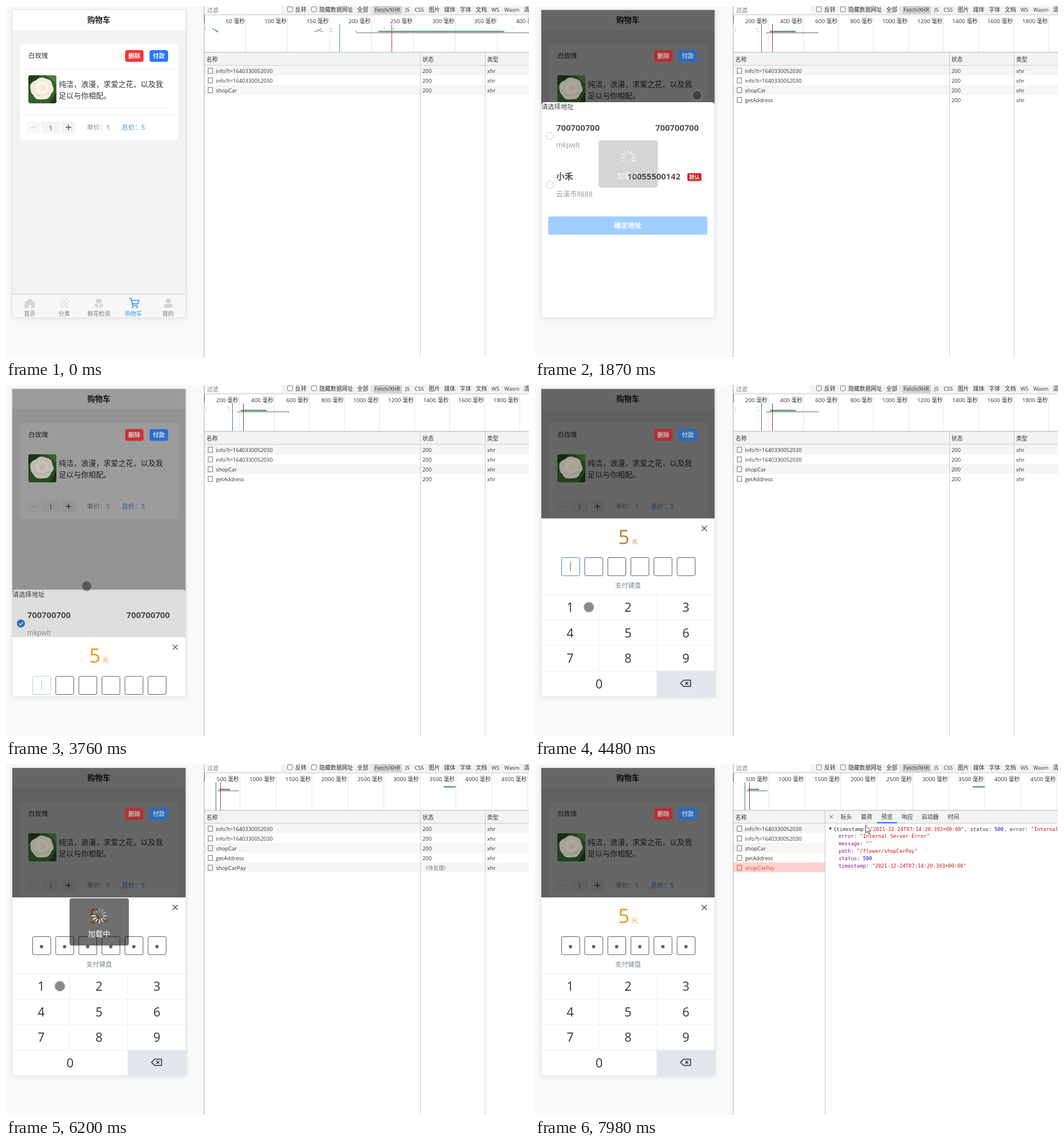
Recreate the animation shown at these times as an HTML page. Size 913x613 px, loop 8 s.

```html
<!DOCTYPE html>
<html lang="zh-CN">
<head>
<meta charset="utf-8">
<title>购物车</title>
<style>
html, body { margin: 0; width: 100%; height: 100%; overflow: hidden; background: #f8faf9; }
svg { display: block; font-family: "Open Sans", "Noto Sans CJK SC", "Noto Sans CJK", sans-serif; }
.mono { font-family: "DejaVu Sans Mono", monospace; white-space: pre; }
</style>
</head>
<body>
<svg id="stage" width="913" height="613" viewBox="0 0 913 613"></svg>
<script>
const LOOP = 8000;

// --- markup helpers: text is placed by its vertical centre ---
const rect = (x, y, w, h, fill, more = '') =>
  `<rect x="${x}" y="${y}" width="${w}" height="${h}" fill="${fill}" ${more}/>`;
const line = (x1, y1, x2, y2, color, w = 1) =>
  `<path d="M${x1} ${y1}L${x2} ${y2}" stroke="${color}" stroke-width="${w}"/>`;
const circle = (x, y, r, fill, more = '') =>
  `<circle cx="${x}" cy="${y}" r="${r}" fill="${fill}" ${more}/>`;
const path = (d, fill, more = '') => `<path d="${d}" fill="${fill}" ${more}/>`;
const text = (x, y, s, size, fill = '#333', more = '') =>
  `<text x="${x}" y="${y + size * 0.365}" font-size="${size}" fill="${fill}" ${more}>${s}</text>`;
const group = (id, body, more = '') => `<g id="${id}" ${more}>${body}</g>`;
const range = (n, f) => Array.from({ length: n }, (_, i) => f(i)).join('');
const MID = 'text-anchor="middle"', END = 'text-anchor="end"', BOLD = 'font-weight="700"';
const MIDBOLD = MID + ' ' + BOLD;

// --- shop page ---
function stepper() {
  return rect(36, 202, 24, 20, '#f7f8fa', 'rx="2"') + rect(62, 202, 32, 20, '#f2f3f5') +
    rect(97, 202, 24, 20, '#f2f3f5', 'rx="2"') + line(43, 212, 53, 212, '#c8c9cc') +
    line(104, 212, 114, 212, '#333', 1.2) + line(109, 207, 109, 217, '#333', 1.2) +
    text(78, 212.5, '1', 11.3, '#5a3a40', MID);
}

function tabBar() {
  const gray = '#d3d4d3', blue = '#2f95f3';
  const petals = range(4, i => circle(98.5 + i % 2 * 7.6, 515.3 + (i >> 1) * 7.6, 3,
    'none', 'stroke="#dcdddd" stroke-width="1.1"'));
  const icons =
    path('M41.5 511L50 518V527H44V521.5H39V527H33V518Z', gray, `stroke="${gray}" stroke-linejoin="round"`) +
    petals +
    path('M157 511L159.7 513L162 510L164.3 513L167 511V516Q166 520 162 520Q158 520 157 516Z' +
      'M154 520Q160 519 161 524V527Q155 527 154 520M170 520Q164 519 163 524V527Q169 527 170 520', gray) +
    path('M215 511H218.5L221 523H230M219.3 514H232L230 520H220.5', 'none',
      `stroke="${blue}" stroke-width="1.7" stroke-linejoin="round"`) +
    circle(221.5, 526, 1.5, blue) + circle(229, 526, 1.5, blue) +
    circle(283.5, 515, 4.3, gray) + path('M276 527V524Q276 520 280 520H287Q291 520 291 524V527Z', gray);
  const names = ['首页', '分类', '鲜花检测', '购物车', '我的'];
  return rect(11, 504, 303, 40, '#f7f7fa') + line(11, 503.5, 314, 503.5, '#cfcfd2') + icons +
    names.map((s, i) => text(41.3 + i * 60.4, 537, s, 9.9, i === 3 ? blue : '#777', MID)).join('');
}

function shopPage() {
  return rect(11, 6, 303, 538, '#f2f2f2') + rect(11, 6, 303, 36, '#fff') +
    text(162, 24.5, '购物车', 13.3, '#222', MIDBOLD) +
    rect(24, 66, 277, 168, '#fff', 'rx="5"') +
    text(39, 87, '白玫瑰', 11.4) +
    line(24, 109.5, 301, 109.5, '#f1f1f1') + line(36, 178, 288, 178, '#f4f4f4') +
    line(24, 190.5, 301, 190.5, '#f0f0f0') +
    text(92, 136.5, '纯洁，浪漫，求爱之花，以及我', 13) + text(92, 156, '足以与你相配。', 13) +
    stepper() + text(141, 212, '单价：5', 11.3, '#8c8c8c') + text(202, 212, '总价：5', 11.3, '#3a86ee') +
    tabBar();
}

// Parts that stay brighter than the rest under the dark layer.
function brightParts() {
  const rose = rect(39, 121, 49, 49, '#33602a') +
    path('M39 121H60L46 140L39 136ZM88 150L76 170H88Z', '#20401b') + path('M70 121H88V136Z', '#4f7c3c') +
    path('M43 146Q40 133 52 130Q60 122 70 127Q80 128 81 139Q86 147 79 153Q76 164 64 163Q51 165 48 156Q43 152 43 146', '#f3ece0') +
    circle(63, 143, 11, '#fcf6ea') + circle(64, 143, 6, '#f7e8cc') +
    path('M50 153Q62 160 76 151', 'none', 'stroke="#e2d8c6" stroke-width="1.5"');
  const button = (x, w, color, s) => rect(x, 77, w, 20.5, color, 'rx="4"') +
    text(x + w / 2, 87.3, s, 10.4, '#fff', MIDBOLD);
  return `<g clip-path="url(#thumb)">${rose}</g>` +
    button(208, 32, '#f53338', '删除') + button(250.5, 32.5, '#2878ff', '付款') +
    group('brightDim', rect(39, 121, 49, 49, '#000', 'rx="4"') +
      rect(208, 77, 32, 20.5, '#2a2c2c', 'rx="4"') + rect(250.5, 77, 32.5, 20.5, '#2b5038', 'rx="4"'));
}

function addressSheet() {
  const entry = (y, name, x, phone, place) =>
    text(37, y, name, 14.8, '#555', BOLD) + text(x, y, phone, 14.8, '#555', BOLD) +
    text(37, y + 30.5, place, 12, '#999') +
    circle(26, y + 14.5, 6.5, '#fff', 'stroke="#c8c9cc"');
  const shape = 'M11 544V174Q11 168 17 168H308Q314 168 314 174V544Z';
  return path(shape, '#fff') +
    text(11, 176, '请选择地址', 11.3, '#444') +
    entry(212.5, '700700700', 210, '700700700', 'mkpwlt') +
    entry(298, '小禾', 161, '10055500142', '云溪市8888') +
    rect(266, 292, 24.5, 13.5, '#dd1418', 'rx="2"') + text(278.2, 298.8, '默认', 9.3, '#fff', MIDBOLD) +
    group('check', circle(26, 227, 7, '#3381c8') +
      path('M22.7 227L25.2 229.6L29.6 224.6', 'none', 'stroke="#fff" stroke-width="1.5"')) +
    rect(23, 367.5, 278, 32, '#a0cfff', 'rx="4" id="confirm"') +
    text(162, 383.5, '确定地址', 12, '#fff', MIDBOLD) +
    group('sheetDim', path(shape, '#000'));
}

const boxX = i => 46 + i * 40.3;
function paySheet() {
  const rows = [366.5, 410.5, 455, 499.5];
  const digits = range(9, i => text(61.5 + i % 3 * 101, 388.5 + (i / 3 | 0) * 44.4, i + 1, 21.5, '#333', MID));
  return rect(11, 233, 303, 311, '#fff') +
    path('M291 246L300 255M300 246L291 255', 'none', 'stroke="#444" stroke-width="1.2"') +
    group('amount', text(155, 265.3, '5', 34.5, 'currentColor', MID) + text(169, 273, '元', 10, 'currentColor')) +
    range(6, i => rect(boxX(i) + .5, 301.5, 31.5, 31.5, '#fff', 'class="box" rx="2"') +
      circle(boxX(i) + 16, 319, 3, '#666', 'class="dot"')) +
    rect(0, 309, 1, 16, '#555', 'id="caret"') +
    text(162.5, 350, '支付键盘', 11.3, '#7d8894', MID) +
    rect(11, 366, 101, 45, '#eeeff2', 'id="keyDown"') +
    rows.map(y => line(11, y, 314, y, '#f0f0f2')).join('') +
    line(111.5, 366, 111.5, 499, '#f0f0f2') + line(212.5, 366, 212.5, 544, '#f0f0f2') +
    rect(213, 499.5, 101, 44.5, '#e4e6ef') + digits + text(112, 522, '0', 21.5, '#333', MID) +
    path('M254 521L259.5 515.5H271.5V526.5H259.5Z', 'none', 'stroke="#333" stroke-width="1.6" stroke-linejoin="round"') +
    path('M262.5 518.5L267.5 523.5M267.5 518.5L262.5 523.5', 'none', 'stroke="#333" stroke-width="1.5"');
}

function toast() {
  const spokes = range(12, i => `<path d="M0 -7V-12.5" stroke="#fff" stroke-width="1.8" stroke-linecap="round"
    opacity="${1 - i * 0.07}" transform="rotate(${-30 * i})"/>`);
  return rect(111, 234.5, 103.5, 82.5, '#000', 'rx="4" opacity=".57"') + group('spinner', spokes) +
    text(162.5, 296.3, '加载中', 13, '#fff', MID + ' font-weight="500"');
}

// --- network panel ---
function toolbar() {
  const items = [[505, '反转'], [547, '隐藏数据网址'], [613, '全部'], [643.5, 'Fetch/XHR'], [697, 'JS'],
    [713.5, 'CSS'], [738, '图片'], [765, '媒体'], [792.5, '字体'], [820, '文档'], [847.5, 'WS'],
    [870, 'Wasm'], [904, '清除']];
  const tick = x => rect(x, 1.5, 8.5, 8.5, '#fff', 'rx="1.5" stroke="#767676"');
  return rect(346, 0, 567, 15, '#f1f3f4') + rect(348, 0, 132, 13, '#fff') + text(351, 7, '过滤', 10, '#777') +
    tick(491.5) + tick(533.5) + line(637.5, 0, 637.5, 13, '#cacdd1') + rect(641, 0, 50, 14, '#cfd0d2', 'rx="2"') +
    items.map(([x, s]) => text(x, 6.8, s, /[A-Z]/.test(s) ? 9.2 : 9.8)).join('') +
    line(346, 15.5, 913, 15.5, '#cdcdcd');
}

function overview(id, first, gap, unit, marks) {
  return group(id, range(9, i => {
    const x = first + i * gap;
    return line(x, 16, x, 80, '#e3e3e3') + text(x - 1.5, 26.3, `${unit * (i + 1)} 毫秒`, 9.8, '#333', END);
  }) + marks);
}

function table() {
  const names = ['info?t=1640330052030', 'info?t=1640330052030', 'shopCar', 'getAddress', 'shopCarPay'];
  const rows = names.map((s, i) => {
    const y = 104 + i * 17;
    const cells = rect(346, y, 567, 17, i % 2 ? '#fff' : '#f5f5f5', `id="bg${i}"`) +
      rect(353, y + 4.5, 7.5, 9, '#fff', `id="tick${i}" stroke="#777"`) +
      text(366.5, y + 9.3, s, 9.35, '#333', `id="name${i}"`) +
      text(727, y + 9.3, i < 4 ? '200' : '（待处理）', 9.35, i < 4 ? '#333' : '#777', `id="code${i}"`) +
      text(840, y + 9.3, 'xhr', 9.35, '#333', `id="type${i}"`);
    return group('row' + i, cells);
  }).join('');
  return rect(346, 82, 567, 22, '#f1f3f4') + line(346, 81, 913, 81, '#c4c7ca', 1.5) +
    line(346, 103.5, 913, 103.5, '#cdcdcd') + rows +
    line(723.5, 82, 723.5, 613, '#cdcdcd') + line(836.5, 82, 836.5, 613, '#cdcdcd') +
    text(350, 93, '名称', 9.8) + text(727, 93, '状态', 9.8) + text(840, 93, '类型', 9.8);
}

function preview() {
  const span = (s, c) => `<tspan fill="${c}">${s}</tspan>`;
  const str = s => span(`"${s}"`, '#c41a16'), num = span('500', '#1c00cf');
  const stamp = str('2021-12-24T07:14:20.393+00:00');
  const fields = [['error', str('Internal Server Error')], ['message', str('')],
    ['path', str('/flower/shopCarPay')], ['status', num], ['timestamp', stamp]];
  const mono = (x, y, s) => text(x, y, s, 8.82, '#333', 'class="mono"');
  const tabs = [[533.5, '标头'], [569, '载荷'], [604.5, '预览'], [640, '响应'], [675, '启动器'], [720.5, '时间']];
  return rect(506, 82, 407, 531, '#fff') + rect(506, 82, 407, 21.5, '#f1f3f4') +
    line(506, 103.5, 913, 103.5, '#cdcdcd') + line(506.5, 82, 506.5, 613, '#c4c4c4') +
    path('M514.5 89.5L520 95M520 89.5L514.5 95', 'none', 'stroke="#555"') +
    tabs.map(([x, s]) => text(x, 92.5, s, 9.9)).join('') + rect(597, 101.5, 35, 2, '#1a73e8') +
    path('M512.5 111H518.5L515.5 115.5Z', '#555') +
    mono(521, 113.3, `{timestamp: ${stamp}, status: ${num}, error: ${str('Internal Server Error')}`) +
    fields.map(([k, v], i) => mono(530, 126.2 + i * 12.85, span(k, '#881391') + ': ' + v)).join('');
}

function network() {
  const crumbs = range(4, i => rect(360 + i * 2.4, 39 + i * 1.7, 4, 1.4, i > 1 ? '#27a05a' : '#7fb3c8')) +
    range(4, i => rect(538 + i * 3, 44 - i * 1.4, 5, 1.3, '#6fb5a8')) + rect(547, 43.8, 7, 1.3, '#7fb8d8') +
    rect(347, 39, 2, 1.5, '#9ab') + rect(566, 39, 3, 2, '#a8cbe4') + rect(565, 43.5, 5, 1.5, '#a8cbe4') +
    rect(609, 43.5, 4, 1.5, '#9cb') + rect(660, 37, 1.5, 2, '#bbb') + rect(676, 39, 2, 2, '#c9a') +
    rect(885, 37, 1.5, 2, '#ccc');
  return rect(346, 0, 567, 613, '#fff') + toolbar() +
    overview('time0', 418.5, 73.2, 50, crumbs + rect(611, 46, 302, 1.6, '#a3a3a3') +
      rect(650, 43.5, 220, 2, '#23a24d') + line(582.5, 32, 582.5, 80, '#3d8fd6') + line(673.5, 32, 673.5, 80, '#bb3a52')) +
    overview('time1', 407.3, 61.2, 200, rect(349, 39, 1.5, 7, '#c5dce4') + rect(386, 39, 4, 1.3, '#b8d4dc') +
      rect(388, 44, 3, 1.3, '#b8d4dc') + rect(403, 46, 92, 1.6, '#9a9a9a') + rect(410, 43.5, 45, 2, '#2b8a4c') +
      line(395.5, 32, 395.5, 80, '#3b6fb5') + line(414.5, 32, 414.5, 80, '#a92a35')) +
    overview('time2', 408.3, 62.8, 500, rect(369, 46, 37, 1.6, '#9a9a9a') + rect(372, 43.5, 19, 1.8, '#3a6b58') +
      rect(764, 39, 21, 1.8, '#3c7d68') + line(366.5, 32, 366.5, 80, '#2f7f74') + line(374.5, 32, 374.5, 80, '#a92a35')) +
    table() + group('preview', preview()) + line(346, 0, 346, 613, '#ababab') + line(346.5, 16, 346.5, 30, '#8a5a5a');
}

document.getElementById('stage').innerHTML = `<defs>
  <clipPath id="screen">${rect(11, 6, 303, 538, '#000')}</clipPath>
  <clipPath id="thumb">${rect(39, 121, 49, 49, '#000', 'rx="4"')}</clipPath>
  <filter id="soft" x="-10%" y="-10%" width="120%" height="120%"><feGaussianBlur stdDeviation="5"/></filter></defs>` +
  rect(0, 0, 346, 613, '#f8faf9') + rect(11, 8, 303, 538, '#000', 'opacity=".09" filter="url(#soft)"') +
  `<g clip-path="url(#screen)">` + shopPage() + rect(11, 6, 303, 538, '#000', 'id="dim"') + brightParts() +
  group('address', addressSheet()) + group('pay', paySheet()) + '</g>' +
  rect(10.5, 6.5, 303.5, 538, 'none', 'stroke="#dfe1e1"') + group('toast', toast()) + network() +
  group('touch', circle(0, 0, 8.5, '#1c1c1c', 'fill-opacity=".52" stroke="#999" stroke-opacity=".6" stroke-width="1.6"')) +
  group('arrow', path('M0 0V13.5L3.2 10.6L5.4 15.5L7.6 14.5L5.4 9.8H9.6Z', '#fff', 'stroke="#222" stroke-width=".9"'));

// --- motion ---
const el = {};
document.querySelectorAll('[id]').forEach(e => el[e.id] = e);
const boxes = document.querySelectorAll('.box'), dots = document.querySelectorAll('.dot');
const set = (e, k, v) => e.setAttribute(k, v);
const show = (e, on) => set(e, 'display', on ? 'inline' : 'none');
const ramp = (t, a, b) => Math.min(1, Math.max(0, (t - a) / (b - a)));
const easeOut = p => 1 - (1 - p) ** 2;

const pointer = [
  [330, 862, 578], [460, 735, 475], [670, 735, 475], [1330, 267, 88], [1560, 267, 88], [1870, 283, 156],
  [2280, 236, 201], [2350, 236, 201], [2610, 145, 267], [2890, 145, 267], [3110, 26, 227], [3250, 26, 227],
  [3500, 150, 383], [3600, 150, 383], [3760, 141, 351], [4200, 94, 388], [6300, 94, 388], [6680, 380, 330],
  [6750, 380, 330], [7080, 410, 178], [7500, 410, 178], [7760, 600, 150], [7960, 577, 107], [LOOP, 577, 107]];

function pointerAt(t) {
  const i = Math.max(1, pointer.findIndex(k => k[0] > t));
  const [a, x1, y1] = pointer[i - 1], [b, x2, y2] = pointer[i];
  const p = ramp(t, a, b);
  return [x1 + (x2 - x1) * p, y1 + (y2 - y1) * p];
}

const KEY_START = 5100, KEY_GAP = 145;

function draw(t) {
  const [x, y] = pointerAt(t);
  show(el.touch, t >= 330 && x < 346);
  show(el.arrow, t >= 330 && x >= 346);
  for (const e of [el.touch, el.arrow]) set(e, 'transform', `translate(${x} ${y})`);

  // address sheet leaves while the payment sheet enters
  const addressIn = ramp(t, 1580, 1870), addressOut = ramp(t, 3548, 3848) ** 2, payIn = ramp(t, 3706, 4006);
  const shadeA = 0.6 * addressIn * (1 - addressOut), shadeB = 0.6 * payIn ** 0.9;
  const shade = 1 - (1 - shadeA) * (1 - shadeB);
  set(el.dim, 'opacity', shade);
  set(el.brightDim, 'opacity', shade * 0.52);
  set(el.sheetDim, 'opacity', shadeB);
  set(el.address, 'transform', `translate(0 ${376 * (1 - easeOut(addressIn) + addressOut)})`);
  set(el.pay, 'transform', `translate(0 ${311 * (1 - easeOut(payIn))})`);
  show(el.address, addressIn > 0 && addressOut < 1);
  show(el.pay, payIn > 0);
  show(el.check, t >= 3180);
  set(el.confirm, 'fill', t >= 3180 ? '#409eff' : '#a0cfff');

  // payment code
  set(el.amount, 'color', t > 4200 && t < 4620 ? '#c07d28' : '#f5921a');
  const typed = t < KEY_START ? 0 : Math.min(6, Math.floor((t - KEY_START) / KEY_GAP) + 1);
  const sinceKey = t - KEY_START - (typed - 1) * KEY_GAP;
  show(el.keyDown, typed > 0 && sinceKey < 75);
  dots.forEach((d, i) => show(d, i < typed));
  boxes.forEach((b, i) => set(b, 'stroke', i === typed ? (payIn < 1 ? '#b4cbe2' : '#3b80ee') : '#5c5c5c'));
  show(el.caret, typed < 6);
  set(el.caret, 'x', boxX(typed) + 15.5);
  set(el.caret, 'opacity', payIn < 1 ? 0.45 : 1);

  const busy = t < 4000 ? ramp(t, 1530, 1600) * (1 - ramp(t, 1650, 1960))
    : ramp(t, 5950, 6100) * (1 - ramp(t, 6450, 6680));
  show(el.toast, busy > 0);
  set(el.toast, 'opacity', busy);
  set(el.spinner, 'transform', `translate(163 265) rotate(${Math.floor(t / 800 * 12) * 30 % 360})`);

  // network log
  const asked = t >= 1590, paid = t >= 5970, failed = t >= 6480, opened = t >= 7170;
  show(el.time0, !asked);
  show(el.time1, asked && !paid);
  show(el.time2, paid);
  show(el.row3, asked);
  show(el.row4, paid);
  el.code4.textContent = failed ? '500' : '（待处理）';
  set(el.code4, 'fill', failed ? '#e8483f' : '#777');
  for (const e of [el.name4, el.type4]) set(e, 'fill', failed ? '#e8483f' : '#333');
  set(el.tick4, 'stroke', failed ? '#e8483f' : '#777');
  set(el.tick4, 'fill', opened ? '#fad2cf' : '#fff');
  set(el.bg4, 'fill', opened ? '#fad2cf' : '#f5f5f5');
  show(el.preview, opened);
}

const start = performance.now();
function tick() {
  draw((performance.now() - start) % LOOP);
  requestAnimationFrame(tick);
}
tick();
</script>
</body>
</html>
```
